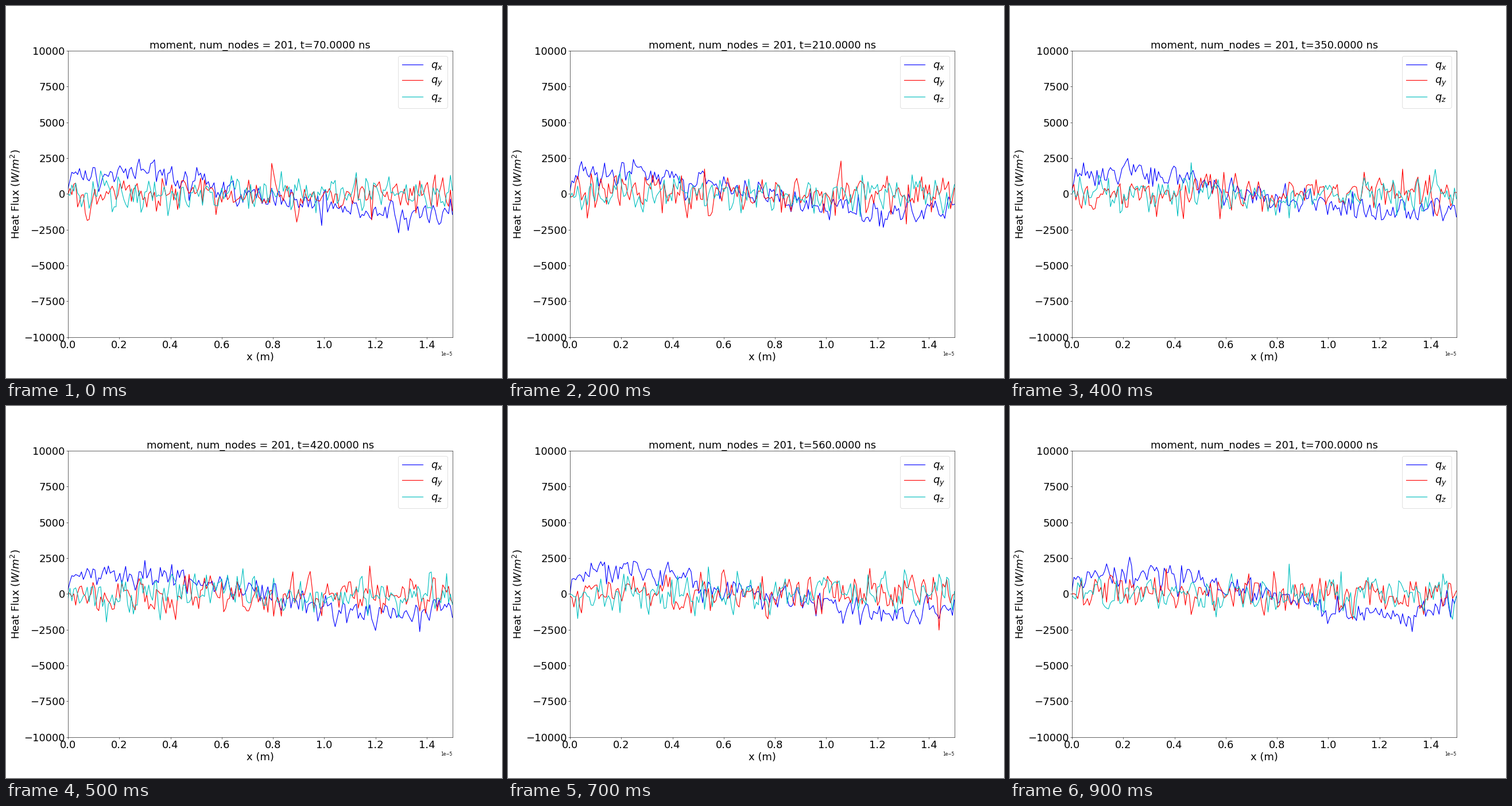
Animation of 864 by 648 pixels, one loop 1000 ms. Source, as a matplotlib script:

```python
import numpy as np
import matplotlib.pyplot as plt
from matplotlib.animation import FuncAnimation

FRAMES = 10
INTERVAL = 100
NODES = 201
LENGTH = 1.5e-5
STEP_NS = 70
SIZE = 24

plt.rcParams["font.family"] = "DejaVu Sans"

x = np.linspace(0, LENGTH, NODES)

# Mean heat flux along x: a quick rise at the wall, then a slow fall through zero.
trend = np.interp(
    x * 1e5,
    [0, 0.015, 0.1, 0.22, 0.32, 0.5, 0.75, 1.0, 1.3, 1.42, 1.5],
    [350, 1200, 1450, 1600, 1450, 800, 0, -900, -1550, -1300, -900],
)
edge = np.clip(0.3 + np.arange(NODES) / 8, 0, 1)


def noise(rng, spread):
    """Slightly correlated noise that calms down towards the left wall."""
    raw = rng.normal(size=NODES + 2)
    smooth = np.convolve(raw, [0.16, 1, 0.16], mode="valid")
    return spread * edge * smooth


def fluxes(frame):
    rng = np.random.default_rng(700 + frame)
    return trend + noise(rng, 450), noise(rng, 640), noise(rng, 640)


fig, ax = plt.subplots(figsize=(16, 12), dpi=54)
fig.subplots_adjust(left=0.125, right=0.9, bottom=0.11, top=0.88)

lines = [
    ax.plot(x, np.zeros(NODES), color, label=f"$q_{axis}$")[0]
    for color, axis in zip("brc", "xyz")
]
ax.set_xlim(0, LENGTH)
ax.set_ylim(-10000, 10000)
ax.set_xlabel("x (m)", fontsize=SIZE)
ax.set_ylabel("Heat Flux ($W/m^2$)", fontsize=SIZE)
ax.tick_params(labelsize=SIZE)
ax.xaxis.get_offset_text().set_fontsize(10)
ax.legend(loc="upper right", fontsize=SIZE, labelspacing=0.4)
title = ax.set_title("", fontsize=SIZE)


def update(frame):
    for line, flux in zip(lines, fluxes(frame)):
        line.set_ydata(flux)
    time = STEP_NS * (frame + 1)
    title.set_text(f"moment, num_nodes = {NODES}, t={time:.4f} ns")
    return [*lines, title]


anim = FuncAnimation(fig, update, frames=FRAMES, init_func=lambda: update(0),
                     interval=INTERVAL, repeat=True, repeat_delay=0)
plt.show()
```
